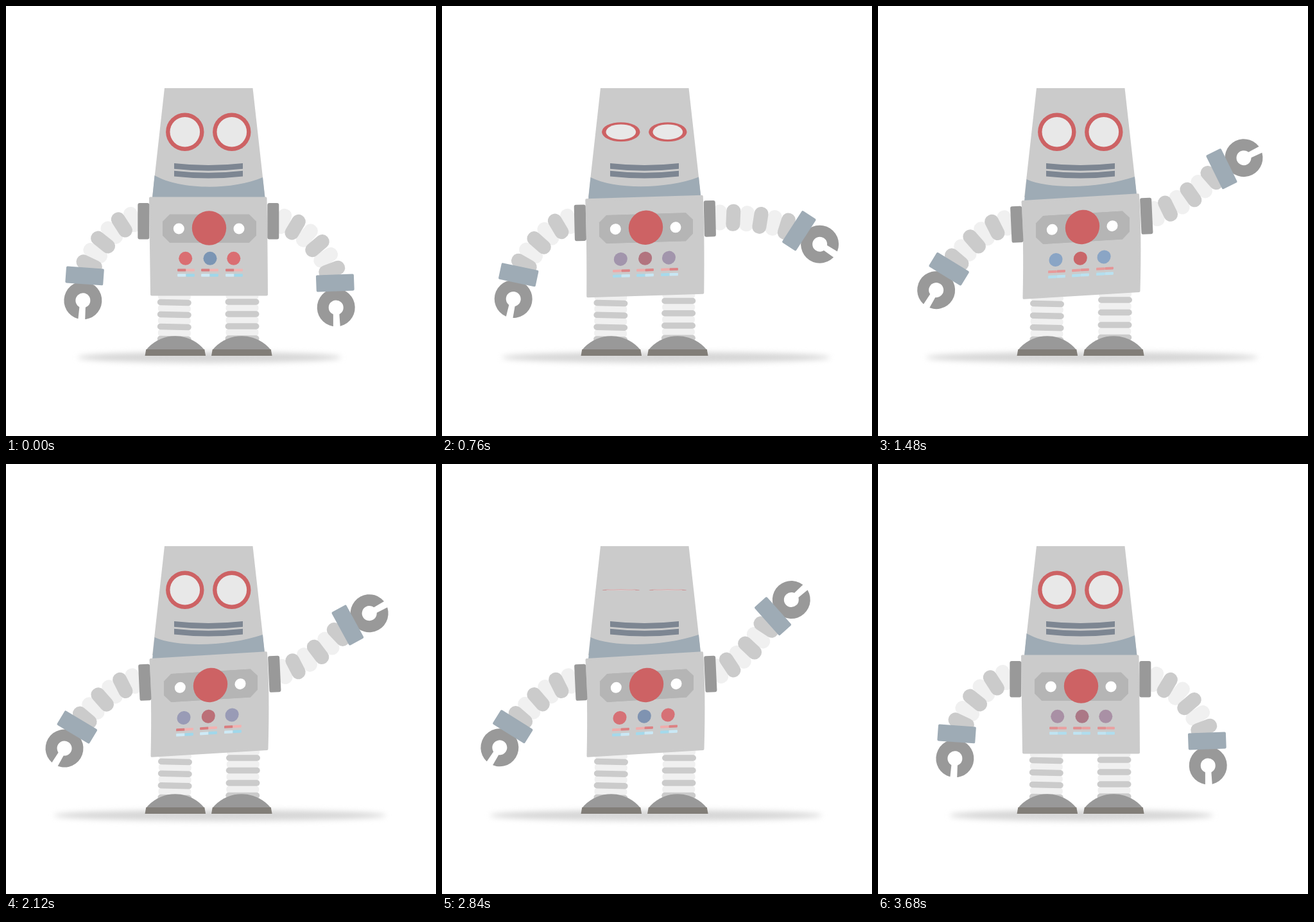
These frames come from a looping animation (670 px wide and 670 px high, 3720 ms). An HTML page with a canvas:

```html
<!DOCTYPE html>
<html lang="en">
<head>
<meta charset="utf-8">
<title>Waving robot</title>
<style>
  html, body { margin: 0; width: 100%; height: 100%; overflow: hidden; background: #fff; }
  canvas { display: block; }
</style>
</head>
<body>
<canvas id="stage" width="670" height="670"></canvas>
<script>
const LOOP = 3720;
const ctx = document.getElementById('stage').getContext('2d');
const GREY = '#cbcbcb', LIGHT = '#f0f0f0', DARK = '#999', STEEL = '#9eabb5', RED = '#cd6264';

const rad = deg => deg * Math.PI / 180;
const lerp = (a, b, k) => a + (b - a) * k;
const blend = (a, b, k) => `rgb(${a.map((v, i) => Math.round(lerp(v, b[i], k)))})`;
const cycle = (t, period) => .5 + .5 * Math.cos(2 * Math.PI * t / period);
// Smooth 0 to 1 between two times.
function ramp(t, from, to) {
  const u = Math.min(1, Math.max(0, (t - from) / (to - from)));
  return u * u * (3 - 2 * u);
}

function fill(color, path) {
  ctx.fillStyle = color;
  ctx.beginPath();
  path();
  ctx.fill();
}
const disc = (x, y, r, color) => fill(color, () => ctx.arc(x, y, r, 0, 7));
const poly = (color, ...pts) => fill(color, () => pts.forEach(p => ctx.lineTo(...p)));

function at(x, y, deg, draw, sx = 1, sy = 1) {
  ctx.save();
  ctx.translate(x, y);
  ctx.rotate(rad(deg));
  ctx.scale(sx, sy);
  draw();
  ctx.restore();
}
// Rounded box centred on a point and turned.
function box(x, y, w, h, r, color, deg = 0) {
  at(x, y, deg, () => fill(color, () => ctx.roundRect(-w / 2, -h / 2, w, h, r)));
}

function shadow(lift) {
  const left = lerp(112, 75, lift), right = lerp(522, 592, lift) + 190 * lift * (1 - lift);
  ctx.filter = 'blur(4px)';
  fill('#d6d6d6', () => ctx.ellipse((left + right) / 2, 547.5, (right - left) / 2, 8.5, 0, 0, 7));
  ctx.filter = 'none';
}

function leg(x, y, dx, dy, deg) {
  for (const dark of [0, 1]) for (let i = 0; i < 4; i++) {
    const k = 1 - i / 6;
    box(x + dx * k, y + 19 * i + 9.5 * dark + dy * k,
      dark ? 53 : 51, dark ? 9.5 : 11.5, 5, dark ? GREY : LIGHT, deg);
  }
}

function foot(x) {
  const r = 58.7, half = Math.asin(45.5 / r);
  fill(DARK, () => ctx.arc(x, 514.3 + r, r, -Math.PI / 2 - half, -Math.PI / 2 + half));
  poly('#827e78', [x - 45.5, 535], [x + 45.5, 535], [x + 47.3, 545], [x - 47.3, 545]);
}

// Segmented tube from the shoulder to the wrist; side -1 mirrors it. Angles point down from the horizontal.
function arm(side, x, y, { reach, swing, start, end, hand }) {
  const polar = (r, deg) => [r * Math.cos(rad(deg)), r * Math.sin(rad(deg))];
  const wrist = polar(reach, swing), p1 = polar(reach * .33, start);
  const p2 = polar(-reach * .33, end).map((v, i) => v + wrist[i]);
  const point = (i, t, v = 1 - t) => 3 * p1[i] * v * v * t + 3 * p2[i] * v * t * t + wrist[i] * t ** 3;
  const slope = (i, t, v = 1 - t) => p1[i] * v * v + 2 * (p2[i] - p1[i]) * v * t + (wrist[i] - p2[i]) * t * t;
  at(x, y, 0, () => {
    for (const dark of [0, 1]) for (let i = 1 + dark; i < 7; i += 2) {
      const t = i / 7, deg = Math.atan2(slope(1, t), slope(0, t)) * 180 / Math.PI;
      box(point(0, t), point(1, t), 22, dark ? 42 : 40, 10.5, dark ? GREY : LIGHT, deg);
    }
    at(...wrist, hand, () => {
      disc(38.5, 0, 29.5, DARK);
      disc(38.5, 0, 11.5, '#fff');
      poly('#fff', [42, -4.5], [70, -5.5], [70, 5.5], [42, 4.5]);
      box(0, 0, 26, 59, 2, STEEL);
    });
  }, side);
}

function arms(t, lift) {
  const wave = lag => Math.cos(2 * Math.PI * (t - 1080) / 620 - rad(lag));
  const right = lerp(44.6, -37 - 9 * wave(0), lift);
  const left = lerp(44.7, 33.5 - 1.8 * wave(80), lift * lift);
  arm(-1, 215 + 2 * lift, 329 + 6 * lift, {
    reach: 130, swing: left, start: 3, end: 2.1 * left - 22, hand: 2.84 * left - 41
  });
  arm(1, 411 + 2 * lift, 331 - 2 * lift, {
    reach: 143 + 6 * lift * wave(150), swing: right,
    start: .22 * right - 4.5, end: 1.65 * right + 9, hand: 1.5 * right + 21
  });
}

function head(tilt, open) {
  poly(GREY, [247, 128], [384.5, 128], [403.5, 298], [228, 298]);
  fill(STEEL, () => {
    ctx.moveTo(231.5, 264 + 6 * tilt);
    ctx.bezierCurveTo(270, 286 + tilt, 350, 288 - 5 * tilt, 400, 267 - tilt);
    ctx.lineTo(403.5, 299);
    ctx.lineTo(228, 299 + 5 * tilt);
  });
  for (const x of [278.8, 351.8]) at(x, 196.2, 0, () => {
    disc(0, 0, 29.7, RED);
    disc(0, 0, 23.3, '#e8e8e8');
  }, 1, Math.max(.02, open));
  for (const y of [245, 256.7]) fill('#7d8692', () => {
    ctx.moveTo(262, y);
    ctx.quadraticCurveTo(315.5, y + 6, 369, y);
    ctx.lineTo(369, y + 8.8);
    ctx.quadraticCurveTo(315.5, y + 14.8, 262, y + 8.8);
  });
}

function body(tilt, t) {
  const skewed = (dx, dy, draw) => {
    const k = .06 * tilt;
    ctx.save();
    ctx.transform(1, -k, 0, 1, dx * tilt, dy * tilt + 316 * k);
    draw();
    ctx.restore();
  };
  skewed(.5, 0, () => {
    ctx.lineJoin = 'round';
    ctx.lineWidth = 4;
    ctx.strokeStyle = GREY;
    fill(GREY, () => {
      ctx.moveTo(225, 299.5);
      ctx.lineTo(404.5, 299.5);
      ctx.quadraticCurveTo(405.5 + 3 * tilt, 360, 406, 449.5);
      ctx.lineTo(227, 449.5);
      ctx.quadraticCurveTo(226 + 3 * tilt, 360, 225, 299.5);
      ctx.closePath();
    });
    ctx.stroke();
  });
  skewed(2, -1.5, () => {
    at(317, 346.8, 0, () => {
      for (const s of [-1, 1]) {
        poly('#b5b5b5', [-62 * s, -22], [62 * s, -22], [73 * s, -11], [73 * s, 11], [62 * s, 22], [-62 * s, 22]);
      }
    });
    disc(269.3, 347, 8.5, '#fff');
    disc(363, 347, 8.5, '#fff');
    disc(316.5, 346, 26.7, RED);
  });

  const glow = cycle(t, 3000) ** 1.7, swap = cycle(t, 2040);
  skewed(-2.7, 0, () => {
    disc(279.7, 393.3, 10.5, blend([138, 165, 197], [218, 110, 114], glow));
    disc(318, 393.3, 10.5, blend([201, 102, 105], [123, 149, 180], glow));
    disc(354.8, 393.3, 10.5, blend([138, 165, 197], [218, 110, 114], glow));
  });
  skewed(-2, 0, () => {
    for (const x of [273.8, 310.8, 348.8]) for (const half of [0, 1]) {
      const k = half ? 1 - swap : swap;
      box(x + 13.4 * half, 411.5, 13.4, 4, 1, blend([242, 179, 178], [217, 123, 125], k));
      box(x + 13.4 * half, 419.5, 13.4, 4.5, 1, blend([159, 215, 234], [207, 234, 246], k));
    }
  });
}

function draw(t) {
  const lift = ramp(t, 580, 940) - ramp(t, 3220, 3640);
  const open = Math.min(...[660, 2840].map(blink => ramp(Math.abs(t - blink), 0, 200)));
  ctx.fillStyle = '#fff';
  ctx.fillRect(0, 0, 670, 670);
  shadow(lift);
  leg(262.3, 452.5, 1.2 * lift, 2 * lift, 1.3);
  leg(368, 451.5, 1.5 * lift, -3 * lift, 0);
  foot(263.8);
  foot(367.3);
  arms(t, lift);
  head(lift, open);
  body(lift, t);
  box(214.3 + 2 * lift, 335.3 + 5 * lift, 18, 56.5, 3, DARK, -2.6 * lift);
  box(416.3 + 2 * lift, 335.3 - 8 * lift, 18, 56.5, 3, DARK, -2.6 * lift);
}

(function tick() {
  draw(performance.now() % LOOP);
  requestAnimationFrame(tick);
})();
</script>
</body>
</html>
```
